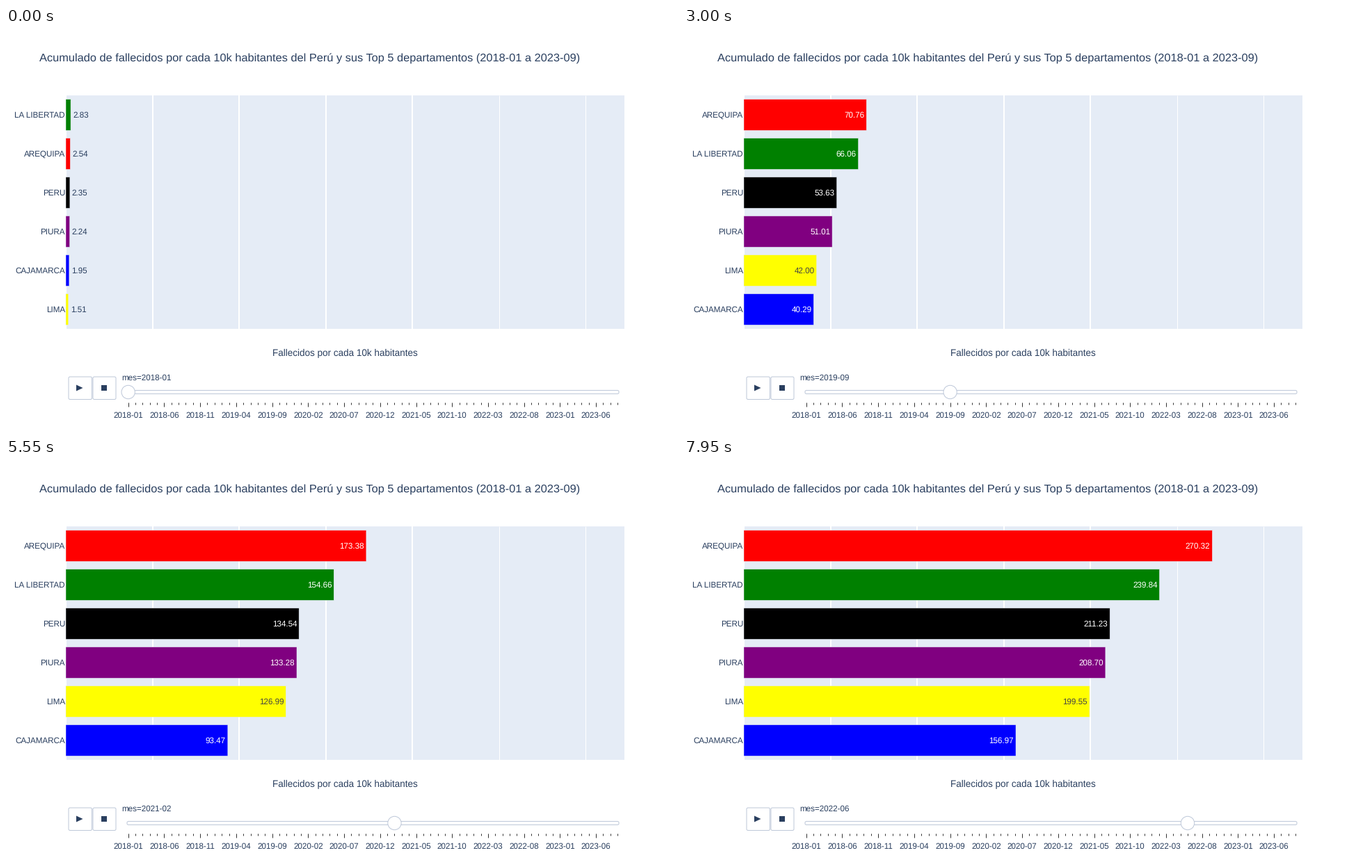
Recreate the animation shown at these times as a matplotlib script. Size 966 by 580 pixels, loop 8 s.

```python
import matplotlib.pyplot as plt
import numpy as np
from matplotlib.animation import FuncAnimation
from matplotlib.patches import Circle, FancyBboxPatch, Polygon, Rectangle

plt.rcParams["font.family"] = "Liberation Sans"
plt.rcParams["text.hinting"] = "none"

W, H, DPI = 966, 580, 100
SCALE = W / 1000                  # the chart is laid out on a 1000 px wide page
FRAMES, INTERVAL, FRAMES_PER_MONTH = 160, 50, 3
INK, BORDER, PLOT_BG = "#2a3f5f", "#bec8d9", "#e5ecf6"

LEFT, RIGHT, TOP, BOTTOM = 86, 889, 97, 433
UNIT = 2.491                      # pixels per death per 10k inhabitants
ROW, BAR_H, PAD = 56, 44.8, 3 * SCALE
SLIDER_X, SLIDER_STEP, N_MONTHS = 175.7, 10.345, 69

# Cumulative totals at a few key months
KEY_MONTHS = [0, 8, 20, 28, 37, 42, 53]
TOTALS = {
    "LA LIBERTAD": ("green", [2.83, 26.93, 66.06, 95.00, 154.66, 194.00, 239.84]),
    "AREQUIPA": ("red", [2.54, 27.04, 70.76, 101.50, 173.38, 221.02, 270.32]),
    "PERU": ("black", [2.35, 22.75, 53.63, 81.29, 134.54, 170.13, 211.23]),
    "PIURA": ("purple", [2.24, 21.51, 51.01, 83.62, 133.28, 167.38, 208.70]),
    "CAJAMARCA": ("blue", [1.95, 17.33, 40.29, 57.93, 93.47, 120.30, 156.97]),
    "LIMA": ("yellow", [1.51, 17.47, 42.00, 69.57, 126.99, 163.15, 199.55]),
}


def mortality_clock():
    """Steady monthly mortality plus pandemic waves, accumulated."""
    months = np.arange(KEY_MONTHS[-1] + 1)
    waves = [(30, 2.2), (38.7, 2.7), (48.4, 0.3)]
    return np.cumsum(1 + sum(size * np.exp(-((months - peak) / 2.3) ** 2)
                             for peak, size in waves))


CLOCK = mortality_clock()

fig = plt.figure(figsize=(W / DPI, H / DPI), dpi=DPI, facecolor="white")
ax = fig.add_axes([0, 0, 1, 1])
ax.set_xlim(0, W)
ax.set_ylim(H, 0)
ax.axis("off")


def pt(px):
    return px * 72 / DPI


def label(x, y, text, size=12, ha="left"):
    return ax.text(x, y, text, fontsize=pt(size * SCALE), color=INK, ha=ha,
                   va="baseline", zorder=5)


def box(x0, y0, x1, y1, radius=2):
    ax.add_patch(FancyBboxPatch((x0, y0), x1 - x0, y1 - y0, fc="white", ec=BORDER, lw=pt(1),
                                boxstyle=f"round,pad=0,rounding_size={radius}"))


def vline(x, y0, y1, color, width):
    ax.plot([x, x], [y0, y1], color=color, lw=pt(width), solid_capstyle="butt", zorder=1.5)


def month_name(month):
    return f"{2018 + month // 12}-{month % 12 + 1:02d}"


def draw_static():
    label(48, 49, "Acumulado de fallecidos por cada 10k habitantes del Perú "
                  "y sus Top 5 departamentos (2018-01 a 2023-09)", 17)
    label(487.5, 472, "Fallecidos por cada 10k habitantes", 14, "center")

    ax.add_patch(Rectangle((LEFT + 1, TOP), RIGHT - LEFT - 1, BOTTOM - TOP, fc=PLOT_BG, lw=0))
    for k in range(1, 7):
        vline(LEFT + 50 * k * UNIT, TOP, BOTTOM, "white", 2 if k < 5 else 1)

    box(90, 502, 123.5, 534.5)
    box(125, 502, 158, 534.5)
    ax.add_patch(Polygon([(101, 513.5), (110.5, 518), (101, 522.5)], fc=INK, lw=0))
    ax.add_patch(Rectangle((137, 514), 8, 8, fc=INK, lw=0))

    box(174, 521.5, 881, 526.5)
    for month in range(N_MONTHS):
        x = SLIDER_X + month * SLIDER_STEP
        major = month % 5 == 0
        vline(x, 538.5, 545 if major else 542, "#333333", 1)
        if major and month < 66:
            label(x, 561, month_name(month), ha="center")


def text_width(text):
    return (6.674 * (len(text) - 1) + 3.34) * SCALE


def place_value(text, value, color, center):
    """Put the value inside its bar, turned inside, or outside, whichever fits."""
    shown = f"{value:.2f}"
    end, room = LEFT + value * UNIT, value * UNIT - 2 * PAD
    inside_color = "#444444" if color == "yellow" else "white"
    text.set_text(shown)
    if room >= text_width(shown):
        text.set(x=end - PAD, y=center + 4, ha="right", va="baseline",
                 rotation=0, color=inside_color)
    elif room >= 14 * SCALE:
        text.set(x=end - PAD - 6.5, y=center, ha="center", va="center",
                 rotation=-90, color=inside_color)
    else:
        text.set(x=end + PAD, y=center + 4, ha="left", va="baseline",
                 rotation=0, color=INK)


draw_static()
handle = ax.add_patch(Circle((SLIDER_X, 524), 9.7, fc="white", ec=BORDER, lw=pt(1), zorder=4))
month_label = label(166, 507, "")
rows = {}
for name, (color, _) in TOTALS.items():
    bar = ax.add_patch(Rectangle((LEFT, 0), 0, BAR_H, fc=color, ec=PLOT_BG, lw=pt(0.5),
                                 snap=False, zorder=3))
    rows[name] = bar, label(85, 0, name, ha="right"), label(0, 0, "")


def update(frame):
    month = frame // FRAMES_PER_MONTH
    values = {name: np.interp(CLOCK[month], CLOCK[KEY_MONTHS], totals)
              for name, (_, totals) in TOTALS.items()}
    for rank, name in enumerate(sorted(values, key=values.get, reverse=True)):
        bar, name_label, value_label = rows[name]
        center = TOP + ROW * (rank + 0.5)
        bar.set_y(center - BAR_H / 2)
        bar.set_width(values[name] * UNIT)
        name_label.set_y(center + 4)
        place_value(value_label, values[name], TOTALS[name][0], center)
    handle.center = SLIDER_X + month * SLIDER_STEP, 524
    month_label.set_text("mes=" + month_name(month))
    return []


anim = FuncAnimation(fig, update, frames=FRAMES, interval=INTERVAL, repeat=True, repeat_delay=0)
plt.show()
```
